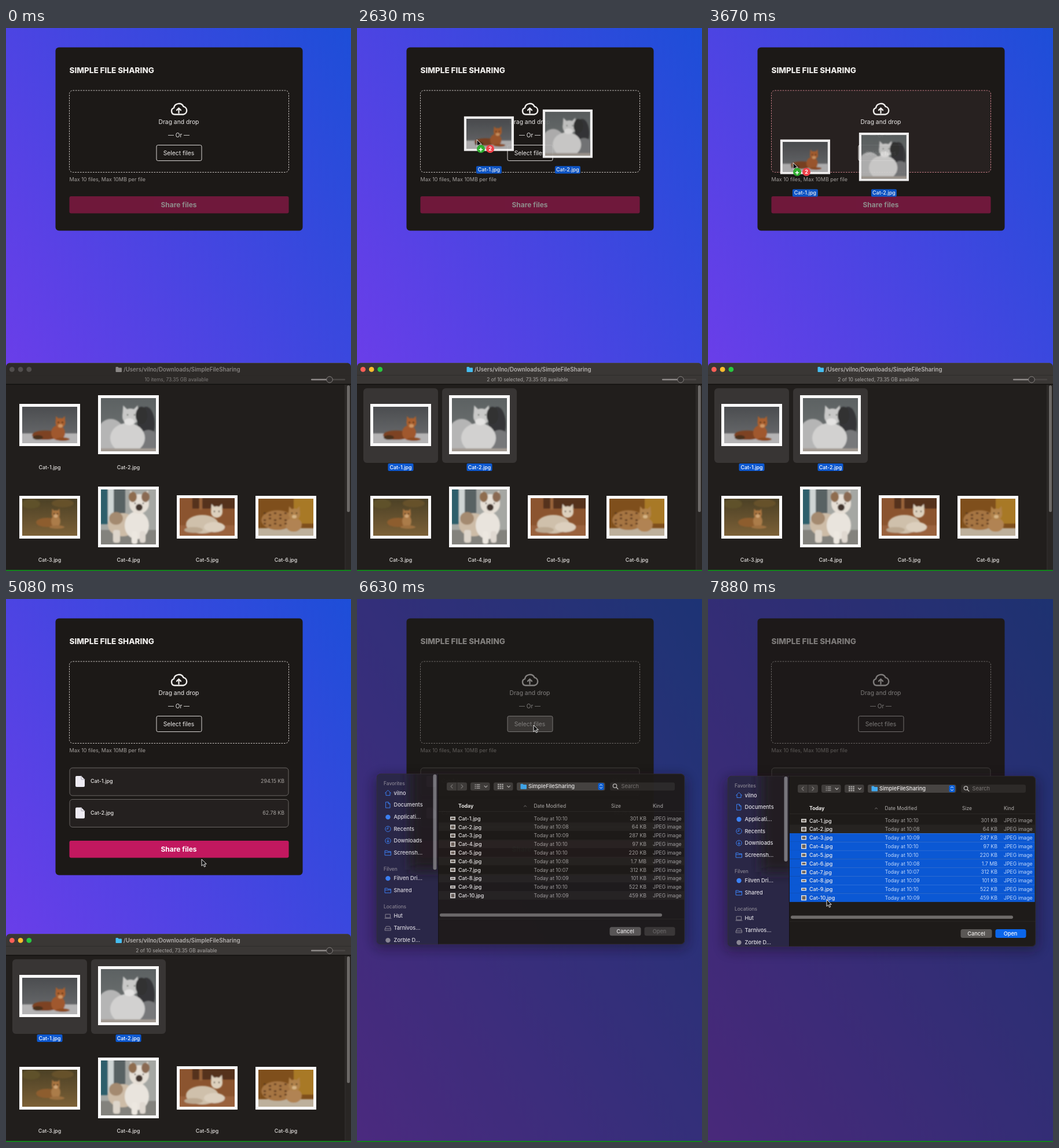
Animation, 596 px wide and 939 px high, one loop 8000 ms. Source, as an HTML page:

```html
<!DOCTYPE html>
<html lang="en">
<head>
<meta charset="utf-8">
<title>Simple file sharing</title>
<style>
html, body { margin: 0; width: 100%; height: 100%; overflow: hidden; }
body { background: linear-gradient(to top right, #7c3aed, #1d4ed8); }
svg { display: block; }
#stage { width: 100vw; height: 100vh; font-family: Inter, Roboto, sans-serif; }
</style>
</head>
<body>
<svg id="stage" viewBox="0 0 596 939" xmlns="http://www.w3.org/2000/svg"></svg>
<script>
const LOOP = 8000;
const stage = document.getElementById('stage');

// ---- markup helpers ----
const text = (x, y, s, size, fill, weight = 400, anchor = 'start') =>
  `<text x="${x}" y="${y + size * 0.36}" font-size="${size}" fill="${fill}" font-weight="${weight}" text-anchor="${anchor}">${s}</text>`;
const box = (x, y, w, h, fill, r = 0, more = '') =>
  `<rect x="${x}" y="${y}" width="${w}" height="${h}" rx="${r}" fill="${fill}" ${more}/>`;
const dot = (x, y, r, fill, more = '') => `<circle cx="${x}" cy="${y}" r="${r}" fill="${fill}" ${more}/>`;
const blob = (x, y, rx, ry, fill) => `<ellipse cx="${x}" cy="${y}" rx="${rx}" ry="${ry}" fill="${fill}"/>`;
const shape = (d, fill) => `<path d="${d}" fill="${fill}"/>`;
const line = (d, stroke, w = 1) =>
  `<path d="${d}" fill="none" stroke="${stroke}" stroke-width="${w}" stroke-linecap="round" stroke-linejoin="round"/>`;
const group = (id, body, more = '') => `<g id="${id}" ${more}>${body}</g>`;
const folder = (x, y, fill) =>
  shape(`M${x} ${y + 1}q0-1 1-1h3l1 1.4h4.5q1 0 1 1V${y + 8}q0 1-1 1h-8.500q-1 0-1-1z`, fill);
const head = (x, y, r, fill) =>
  shape(`M${x - r} ${y}L${x - r * .9} ${y - r * 1.4}L${x - r * .3} ${y - r * .8}H${x + r * .3}L${x + r * .9} ${y - r * 1.4}L${x + r} ${y}z`, fill) +
  dot(x, y, r, fill);
const eyes = (x, y, gap, fill = '#2a2118') => dot(x - gap, y, 1.2, fill) + dot(x + gap, y, 1.2, fill);

// ---- pictures: soft flat shapes inside a white frame ----
const photos = [
  { x: 75.5, y: 686.5, h: 73, bg: 'url(#studio)', art:
    box(-5, 46, 105, 25, '#b4b3b4') + blob(40, 49, 23, 8, '#7d4323') + blob(27, 53, 9, 4, '#4c301f') +
    blob(62, 45, 12, 13, '#a0592d') + blob(70, 56, 12, 3, '#8d4c24') + head(66, 28, 8.5, '#a95f2f') +
    blob(66, 33, 4, 3, '#cf9663') + eyes(66, 27, 3.5) },
  { x: 211.5, y: 686, h: 102, bg: 'url(#dusk)', art:
    blob(78, 45, 15, 30, '#353637') + blob(82, 75, 18, 20, '#77787a') + blob(17, 66, 25, 30, '#b5b5b5') +
    blob(46, 69, 30, 26, '#d2d1d0') + box(-5, 87, 105, 12, '#a29a92') + head(51, 32, 14, '#c9c9c8') +
    blob(70, 30, 10, 15, '#303133') + blob(49, 41, 9, 6, '#e3e2e1') + eyes(52, 29, 6, '#485248') },
  { x: 75.5, y: 846, h: 74, bg: 'url(#grass)', art:
    blob(15, 9, 16, 8, '#5f5129') + blob(70, 8, 19, 7, '#66512c') + blob(43, 41, 19, 8, '#8d5d2f') +
    blob(58, 39, 8, 11, '#ab7c4a') + blob(60, 49, 13, 3, '#9c7040') + head(58, 27, 7, '#a97440') +
    blob(58, 30, 3.5, 3, '#cfa676') + eyes(58, 26, 3) },
  { x: 211.5, y: 845.5, h: 105, bg: '#a5a7a3', art:
    box(-5, -5, 17, 65, '#2f5f6c') + box(12, -5, 10, 68, '#cfd5d4') + box(22, -5, 20, 46, '#596264') +
    box(-5, 70, 105, 30, '#83827d') + blob(37, 61, 25, 20, '#cdbca7') + blob(26, 50, 12, 11, '#a48a6f') +
    blob(62, 62, 21, 24, '#e9e4dd') + box(21, 70, 12, 22, '#ddd5cb', 4) + box(53, 72, 10, 22, '#ece7e0', 4) +
    box(67, 72, 10, 20, '#e0d9d1', 4) + head(66, 25, 17, '#e6dfd6') + blob(55, 13, 7, 9, '#8f6d50') +
    blob(77, 13, 7, 9, '#8a6b52') + blob(66, 31, 6, 6, '#43352d') + eyes(66, 24, 7) },
  { x: 347.5, y: 845.5, h: 75, bg: '#8b542f', art:
    box(22, -5, 78, 23, '#54301c') + box(34, -5, 5, 25, '#98633a') + box(-5, 47, 105, 25, '#9a623c') +
    blob(39, 45, 28, 16, '#cfc0ab') + blob(60, 50, 18, 9, '#dccfbd') + blob(24, 55, 16, 5, '#bba890') +
    head(64, 24, 10, '#ddd0bd') + eyes(64, 23, 4) },
  { x: 483.5, y: 846, h: 74, bg: '#7f4f1c', art:
    box(61, -5, 40, 48, '#a87925') + box(-5, 51, 105, 20, '#bdb09c') + blob(33, 37, 28, 17, '#a67543') +
    blob(61, 45, 14, 12, '#b18352') +
    Array.from({ length: 15 }, (_, i) => blob(11 + i % 5 * 9, 25 + (i / 5 | 0) * 9 + i % 2 * 3, 2.3, 1.5, '#5b391e')).join('') +
    head(62, 27, 10, '#b0824c') + blob(62, 31, 4, 3, '#d6b585') + eyes(62, 25, 4) }
];
const frame = p => box(-52.5, -p.h / 2, 105, p.h, '#fbfafa') +
  `<svg x="-47.5" y="${5 - p.h / 2}" width="95" height="${p.h - 10}">${
    box(0, 0, 95, p.h, p.bg)}<g filter="url(#haze)">${p.art}</g></svg>`;
const tag = (x, y, s) => box(x - 22, y - 6.5, 44, 13, '#0d58cf', 2) + text(x, y, s, 8.9, '#fff', 500, 'middle');

// ---- web page card ----
const fileRow = (y, name, size) =>
  box(110, y, 378, 48, '#24201f', 5, 'stroke="#6a6664"') +
  shape(`M120 ${y + 16}q0-2 2-2h8l6 6v11q0 2-2 2h-12q-2 0-2-2z`, '#eeebf3') +
  line(`M130 ${y + 14}v6h6`, '#aaa6b0', 1) +
  text(146, y + 23, name, 9, '#e9e7e5', 500) + text(481, y + 23, size, 8.8, '#a8a4a1', 400, 'end');
const page =
  box(85.5, 33.5, 427, 317, '#1c1917', 6, 'id="card"') +
  text(109.5, 73.5, 'SIMPLE FILE SHARING', 13.5, '#efedeb', 800) +
  box(109.5, 108, 379, 141.5, 'transparent', 6, 'id="zone" stroke-dasharray="2.6 1.8"') +
  line('M291.5 149.500a5.800 5.800 0 0 1-1.500-11.300a8.800 8.800 0 0 1 16.700-2.300a6.900 6.900 0 0 1-.500 13.600z', '#f1efed', 2.4) +
  line('M298.500 147v-8.500m-3.600 3.600l3.600-3.600l3.600 3.600', '#f1efed', 2.2) +
  text(298.5, 162, 'Drag and drop', 10.3, '#eeeceb', 400, 'middle') +
  text(298.5, 185.5, '— Or —', 10, '#eeeceb', 400, 'middle') +
  box(260, 202.5, 78, 27, 'transparent', 2.5, 'id="pick" stroke="#d9d6d4"') +
  text(298.5, 216, 'Select files', 10.3, '#eeeceb', 400, 'middle') +
  text(109.5, 261.5, 'Max 10 files, Max 10MB per file', 9, '#a5a19e') +
  group('files', fileRow(292, 'Cat-1.jpg', '294.15 KB') + fileRow(346.5, 'Cat-2.jpg', '62.78 KB')) +
  group('share', box(109.5, 291, 379, 29.5, '#c2185f', 3) + text(298.5, 306, 'Share files', 12, '#fff', 700, 'middle'));

// ---- file manager window ----
const lights = ['#fe5f57', '#febc2e', '#28c840'];
const manager =
  `<path id="bar" d="M0 939V587q0-8 8-8H588q8 0 8 8V939z"/>` +
  line('M7 579.500H589', '#4a4648', .8) + box(0, 600, 596, .7, '#2b2927') +
  box(0, 616, 596, 323, '#211e1c') + box(0, 615.5, 596, 1.2, '#0d0c0b') +
  lights.map((c, i) => dot(10.4 + i * 14.7, 590.4, 4.4, c, 'class="light"')).join('') +
  group('dir', folder(189.5, 586, 'currentColor')) +
  `<g id="path">${text(203, 590.5, '/Users/vilno/Downloads/SimpleFileSharing', 9.7, 'currentColor', 600)}</g>` +
  `<text id="status" x="294.500" y="611" font-size="8.400" text-anchor="middle"></text>` +
  box(527, 606.8, 59, 2.4, '#494644', 1) + box(527, 606.8, 30, 2.4, '#8d8987', 1) +
  dot(559, 608, 5.3, '#343130', 'stroke="#85817f"') +
  box(586, 617, 10, 322, '#292624') + box(585.5, 617, .8, 322, '#3a3735') + box(589, 618, 5, 219, '#6c6967', 2.5) +
  photos.map((p, i) => {
    const y = i < 2 ? 759.5 : 919.5, name = `Cat-${i + 1}.jpg`;
    const pick = i < 2 ? group('hot' + i, box(p.x - 64.5, 623, 129, 129, '#383534', 6) + tag(p.x, y, name)) : '';
    return text(p.x, y, name, 8.9, '#e3e0de', 500, 'middle') + pick + `<g transform="translate(${p.x} ${p.y})">${frame(p)}</g>`;
  }).join('') +
  box(0, 0, 0, 0, '#ffffff22', 0, 'id="marquee" stroke="#ffffff66" stroke-width=".8"');

// ---- open dialog ----
const BLUE = '#3b82f6', GREY = '#8b8894', BUTTON = '#403d3b';
const glyphs = {
  home: (x, y) => line(`M${x - 5} ${y}l5-5l5 5M${x - 3.5} ${y - 1}v5h7v-5`, BLUE),
  doc: (x, y) => line(`M${x - 3.5} ${y - 5}h4l3 3v7h-7zM${x + .5} ${y - 5}v3h3`, BLUE),
  mark: (x, y) => dot(x, y, 4.2, BLUE),
  clock: (x, y) => dot(x, y, 4.7, 'none', `stroke="${BLUE}"`) + line(`M${x} ${y - 3}v3h-2.500`, BLUE),
  down: (x, y) => dot(x, y, 4.7, 'none', `stroke="${BLUE}"`) + line(`M${x} ${y - 2.5}v5m-2-2l2 2l2-2`, BLUE),
  dir: (x, y) => line(`M${x - 5} ${y - 4}h4l1 1.500h5v6.500h-10zM${x - 5} ${y - 1}h10`, BLUE),
  laptop: (x, y) => line(`M${x - 4} ${y - 3}h8v6h-8zM${x - 5.5} ${y + 4}h11`, GREY),
  disk: (x, y) => line(`M${x - 5} ${y + 1}l2-4h6l2 4v3h-10zM${x - 5} ${y + 1}h10`, GREY),
  plain: (x, y) => dot(x, y, 4.2, GREY)
};
const side = [
  [323, 'Favorites'], [339.5, 'vilno', 'home'], [360, 'Documents', 'doc'], [381, 'Applicati...', 'mark'],
  [401.5, 'Recents', 'clock'], [422, 'Downloads', 'down'], [443, 'Screensh...', 'dir'],
  [470.5, 'Filven'], [487, 'Filven Dri...', 'mark'], [508, 'Shared', 'dir'],
  [536, 'Locations'], [552, 'Hut', 'laptop'], [573, 'Tarnivos...', 'disk'], [594, 'Zorble D...', 'plain']
].map(([y, s, g]) => g ? glyphs[g](53.5, y) + text(63.5, y, s, 9.2, '#e2e0e6', 500)
                       : text(46, y, s, 8.4, '#8a8793', 500)).join('');
const ROW = 14.83, FIRST = 383.3;
const sizes = ['301 KB', '64 KB', '287 KB', '97 KB', '220 KB', '1.7 MB', '312 KB', '101 KB', '522 KB', '459 KB'];
const minutes = ['10', '08', '09', '10', '10', '08', '07', '09', '10', '09'];
const rows = sizes.map((size, i) => {
  const y = FIRST + i * ROW, top = y - ROW / 2 - .5, h = [6, 8, 7, 9, 7, 6, 7, 5, 5, 9][i];
  return (i % 2 ? box(141, top, 424, ROW, '#262321') : '') +
    group('row' + i, box(141, top, 423.5, ROW + .2, '#0b58d4') + box(160, top, 404, .7, '#3977dd')) +
    box(161, y - h / 2, 9, h, '#e6e4e1') + box(162.5, y - h / 2 + 1.5, 6, h - 3, '#6b625a') +
    text(175, y, `Cat-${i + 1}.jpg`, 9, '#eeeceb', 500) +
    `<g class="info">${text(305.5, y, 'Today at 10:' + minutes[i], 8.7, 'currentColor')}${
      text(500, y, size, 8.8, 'currentColor', 400, 'end')}${text(511, y, 'JPEG image', 8.7, 'currentColor')}</g>`;
}).join('');
const bars = [0, 1, 2].map(i => line(`M204 ${325 + i * 3}h1m2 0h5`, '#bcb9b7', 1.2)).join('');
const tiles = Array.from({ length: 9 }, (_, i) => box(243 + i % 3 * 3.6, 323.5 + (i / 3 | 0) * 3.3, 2.6, 2.4, '#a5a2a0')).join('');
const dialog =
  box(28, 308, 544, 302, '#141016', 14, 'opacity=".4" filter="url(#soft)"') +
  `<g clip-path="url(#panel)">` +
  box(34, 306, 532, 295, '#1e1b19') + box(34, 306, 106.5, 295, '#2a2746') +
  box(92, 290, 60, 182, '#211f22', 0, 'filter="url(#soft)"') +
  box(140.5, 306, 425.5, 295, '#1e1b19') + box(140, 306, .8, 295, '#11100f') +
  side + box(131.5, 307, 6, 147, '#77757c', 3, 'id="sidebar"') +
  box(155, 321, 35, 14, BUTTON, 3) + line('M165 325l-3 3l3 3M180 325l3 3l-3 3', '#7d7a78', 1.2) + box(172.3, 321, .8, 14, '#1c1917') +
  box(196, 321, 33.5, 14, BUTTON, 3) + bars + line('M220 327l2.500 2.500l2.500-2.500', '#b6b3b1', 1.2) +
  box(236, 321, 33.5, 14, BUTTON, 3) + tiles + line('M259.500 327l2.500 2.500l2.500-2.500', '#b6b3b1', 1.2) +
  box(276, 321, 152.5, 14, '#474442', 3) + folder(282.5, 323.5, '#41aaf0') + text(296, 328, 'SimpleFileSharing', 9.3, '#eeeceb', 500) +
  box(416.5, 322, 10, 12, '#0b61dc', 2.5) + line('M419.500 326.500l2-2l2 2M419.500 329.500l2 2l2-2', '#fff', 1) +
  box(437, 321, 112, 14, '#2d2a28', 3) + dot(445.5, 327, 3.2, 'none', 'stroke="#c4c1bf" stroke-width="1.2"') +
  line('M448 329.500l2.800 2.800', '#c4c1bf', 1.3) + text(456.5, 328, 'Search', 9.2, '#7d7977') +
  text(175, 361.5, 'Today', 8.8, '#efedeb', 700) + line('M288.500 363l2-2l2 2', '#8e8b89', .9) +
  text(305.5, 361.5, 'Date Modified', 8.4, '#b5b2b0') + text(439, 361.5, 'Size', 8.4, '#b5b2b0') + text(511, 361.5, 'Kind', 8.4, '#b5b2b0') +
  box(141, 371, 424, .6, '#34312f') + rows +
  box(143, 547.5, 384, 5.5, '#6e6b69', 2.7) + box(141, 557, 425, .8, '#2a2725') +
  box(436.5, 571, 54, 15, '#5a5755', 3.5) + text(463.5, 578.5, 'Cancel', 9.2, '#f0eeec', 500, 'middle') +
  box(496.5, 571, 53, 15, '#3b3836', 3.5, 'id="open"') +
  `<g id="openText">${text(522.5, 578.5, 'Open', 9.2, 'currentColor', 500, 'middle')}</g></g>` +
  box(34.3, 306.3, 531.4, 294.4, 'none', 7, 'stroke="#383534" stroke-width=".6"');

// ---- dragged files and pointer ----
const badge = (x, fill, s) => dot(x, 16, 7, fill) + text(x, 16, s, s === '+' ? 13 : 9, '#fff', 700, 'middle');
const drag = [0, 1].map(i => `<g transform="translate(${i * 136} 0)">` +
  `<g class="ghost">${frame(photos[i])}</g>${tag(0, 62.5, `Cat-${i + 1}.jpg`)}</g>`).join('');
const arrow = '<path d="M0 0V11.500L2.700 9L4.600 13.200L6.600 12.300L4.700 8.200H8.300z" fill="#111" stroke="#fff" stroke-width=".9" stroke-linejoin="round"/>';

const ramp = (id, a, b) => `<linearGradient id="${id}" x2="0" y2="1"><stop stop-color="${a}"/><stop offset="1" stop-color="${b}"/></linearGradient>`;
const blur = (id, size) => `<filter id="${id}" x="-30%" y="-30%" width="160%" height="160%"><feGaussianBlur stdDeviation="${size}"/></filter>`;
stage.innerHTML = `<defs>${ramp('studio', '#4b4d50', '#727375')}${ramp('dusk', '#5c6162', '#777a79')}${
  ramp('grass', '#4b4025', '#84663a')}${blur('soft', 10)}${blur('haze', 1)}
  <clipPath id="panel"><rect x="34" y="306" width="532" height="295" rx="7"/></clipPath></defs>` +
  page + group('manager', manager) + box(0, 0, 596, 939, '#1e1b1a', 0, 'id="dim"') + group('dialog', dialog) +
  group('drag', drag, 'opacity=".94"') + group('cursor', arrow + group('badges', badge(7, '#2fae2f', '+') + badge(23, '#f0434a', '2'))) +
  box(0, 937, 596, 2, '#12821c');

// ---- motion ----
const $ = id => document.getElementById(id);
const all = q => [...stage.querySelectorAll(q)];
const show = (id, on) => { $(id).style.display = on ? '' : 'none'; };
const set = (id, attrs) => { for (const k in attrs) $(id).setAttribute(k, attrs[k]); };
const clamp = v => Math.min(1, Math.max(0, v));
const lightEls = all('.light'), ghosts = all('.ghost'), infos = all('.info');

const track = [
  [380, 600, 850], [1170, 303, 713], [1250, 304, 709], [1420, 304, 709], [1830, 50, 699], [2130, 50, 699],
  [2630, 207, 193], [2920, 188, 203], [3250, 97, 285], [3670, 147, 233], [4040, 149, 250], [4250, 150, 250],
  [4580, 167, 620], [4750, 167, 620], [4920, 338, 450], [5120, 338, 450], [5790, 300, 216], [5960, 300, 216],
  [6130, 305, 218], [6700, 305, 218], [7210, 235, 405], [7380, 235, 409], [7860, 205, 520], [8000, 205, 520]
];
function pointer(t) {
  const i = Math.max(1, track.findIndex(k => k[0] > t));
  const [a, b] = [track[i - 1], track[i]];
  const u = clamp((t - a[0]) / (b[0] - a[0])), e = u * u * (3 - 2 * u);
  return [a[1] + (b[1] - a[1]) * e, a[2] + (b[2] - a[2]) * e];
}

function render(t) {
  const [x, y] = pointer(t);
  show('cursor', t >= 380);
  set('cursor', { transform: `translate(${x} ${y})` });

  // file manager focus and marquee selection
  const active = t >= 420;
  const sweeping = t >= 1420 && t < 1800;
  const hot = [128, 264].map(edge => t >= 1830 || t >= 1420 && x < edge);
  const count = hot[0] + hot[1];
  show('manager', t < 5120);
  set('bar', { fill: active ? '#3a3735' : '#2d2a28' });
  lightEls.forEach((el, i) => el.setAttribute('fill', active ? lights[i] : '#514e4d'));
  $('dir').style.color = active ? '#45bdf0' : '#8a8785';
  $('path').style.color = active ? '#b5b2b0' : '#84817f';
  $('status').textContent = (count ? `${count} of 10 selected` : '10 items') + ', 73.35 GB available';
  set('status', { fill: active ? '#aaa7a5' : '#7d7a78' });
  show('hot0', hot[0]);
  show('hot1', hot[1]);
  show('marquee', sweeping);
  set('marquee', { x, y, width: Math.max(0, 304 - x), height: Math.max(0, 709 - y) });

  // dragging the two files
  const dragging = t >= 2150 && t < 4040;
  const scale = 1 - 0.18 * clamp((t - 2150) / 150);
  show('drag', dragging);
  show('badges', dragging && t > 2250);
  set('drag', { transform: `translate(${x + 25.5 * scale} ${y - 12.5 * scale})` });
  ghosts.forEach(g => g.setAttribute('transform', `scale(${scale})`));
  const over = t >= 3000 && t < 4040;
  set('zone', { stroke: over ? '#cb7f88' : '#cbc6c3', fill: over ? '#272120' : '#1c1917' });

  // uploaded list
  const listed = t >= 4250;
  show('files', listed);
  set('card', { height: listed ? 444 : 317 });
  set('share', { opacity: listed ? 1 : 0.5, transform: `translate(0 ${listed ? 127 : 0})` });
  const hover = t > 5200 && x > 260 && x < 338 && y > 202 && y < 230;
  set('pick', { fill: hover ? '#55514f' : 'transparent' });

  // open dialog
  const p = 1 - (1 - clamp((t - 6500) / 200)) ** 3;
  set('dim', { opacity: 0.54 * p });
  show('dialog', t >= 6500);
  set('dialog', { opacity: p, transform: `translate(0 ${-90 * (1 - p)})` });
  set('sidebar', { height: t < 6750 ? 165 : 147 });
  const last = t >= 7380 ? Math.min(9, Math.floor((y - FIRST) / ROW + 0.5)) : -1;
  infos.forEach((el, i) => {
    const on = i >= 2 && i <= last;
    show('row' + i, on);
    el.style.color = on ? '#c3d9fa' : '#a5a2a0';
  });
  set('open', { fill: last >= 2 ? '#0b66ea' : '#3b3836' });
  $('openText').style.color = last >= 2 ? '#fff' : '#6b6866';
}

let start;
function tick(now) {
  start ??= now;
  render((now - start) % LOOP);
  requestAnimationFrame(tick);
}
render(0);
requestAnimationFrame(tick);
</script>
</body>
</html>
```
